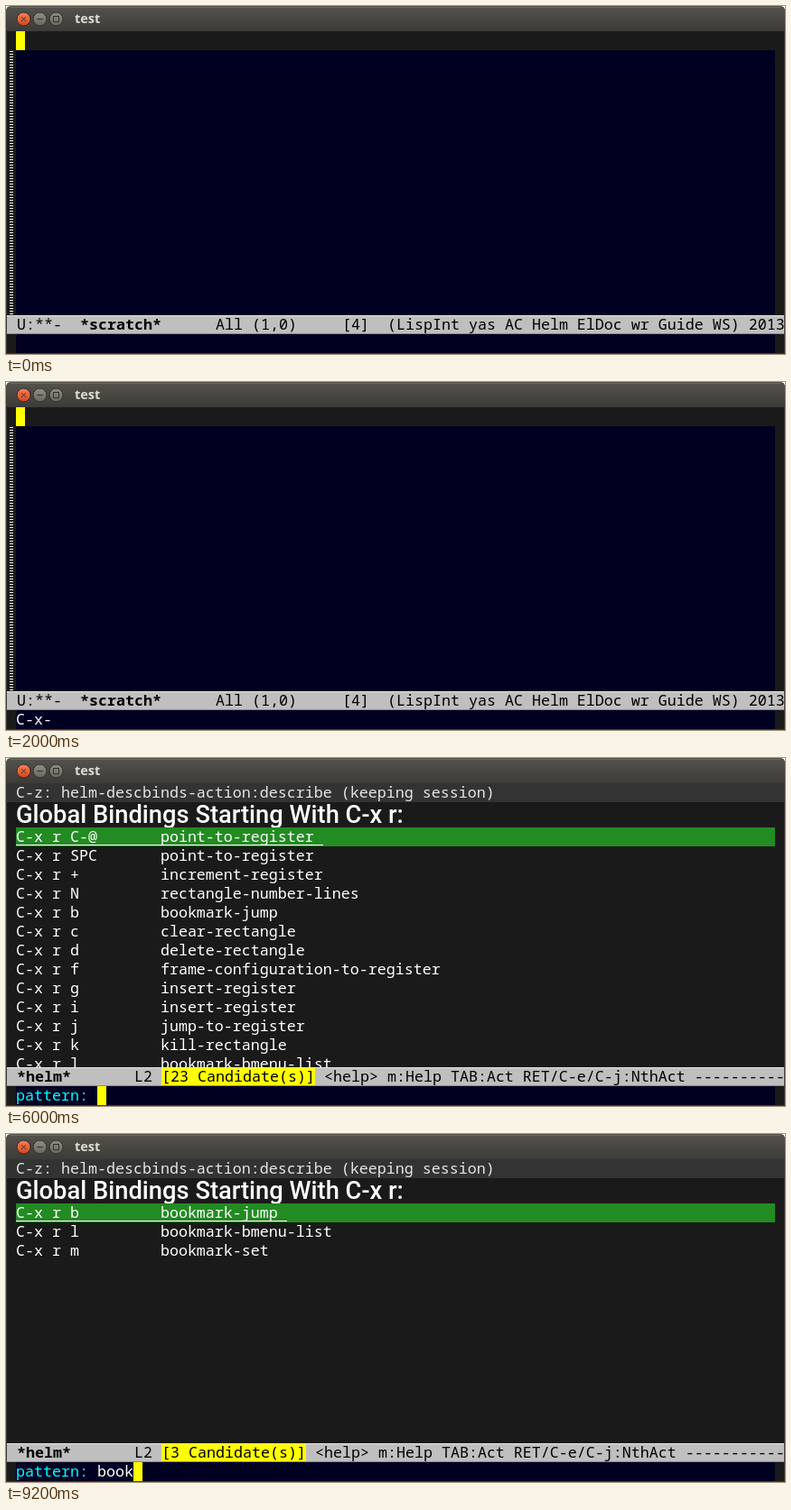
These frames come from a looping animation (862 px wide and 386 px high, 10 s). An HTML page:

```html
<!DOCTYPE html>
<html lang="en">
<head>
<meta charset="utf-8">
<title>test</title>
<style>
  html, body { margin: 0; width: 100%; height: 100%; overflow: hidden; background: #fff; }
  #stage { display: block; width: 862px; height: 386px; }
  text { font: 16.6667px "Noto Sans Mono", "DejaVu Sans Mono", monospace; fill: #fff; white-space: pre; }
  rect { shape-rendering: crispEdges; }
  .bold { font-weight: 700; }
  .title { font: 700 14.5px "Open Sans", "Noto Sans", sans-serif; fill: #dfdbd2; }
  .heading { font: 500 27.3px Roboto, "Noto Sans", sans-serif; }
  .key { fill: #f00; }
  .scene { visibility: hidden; animation: show 10s step-end infinite; animation-delay: calc((var(--i) - 5) * 2s); }
  @keyframes show {
    0% { visibility: visible; }
    20%, 100% { visibility: hidden; }
  }
</style>
</head>
<body>
<svg id="stage" viewBox="0 0 862 386" xmlns="http://www.w3.org/2000/svg"></svg>
<script>
const CELL = 10, ROW = 21, TOP = 28, MODE = 343, ECHO = 364;
const DARK = '#1a1a1a', NAVY = '#000020', YELLOW = '#ff0', FRAME = '#3c3b37';

const esc = s => s.replace(/&/g, '&amp;').replace(/</g, '&lt;');
const rect = (x, y, w, h, fill) => `<rect x="${x}" y="${y}" width="${w}" height="${h}" fill="${fill}"/>`;
const raw = (x, top, markup, fill = '#fff', cls = '') =>
  `<text xml:space="preserve" x="${x}" y="${top + 16}" class="${cls}" style="fill:${fill}">${markup}</text>`;
const text = (x, top, s, fill, cls) => raw(x, top, esc(s), fill, cls);
const scene = (i, markup) => `<g class="scene" style="--i:${i}">${markup}</g>`;

// Tick marks beside the lines past the end of a buffer
const emptyLines = (x, top) => rect(x, top, 4, MODE - top, 'url(#ticks)');

// A status bar; parts are [column, string, bold, background]
function modeLine(x, width, parts, active = true) {
  const [bg, fg, name, light, shade] = active
    ? ['#bfbfbf', '#000', '#000', '#e5e5e5', '#8c8c8c']
    : ['#4d4d4d', '#ccc', '#fff', '#666', '#666'];
  let out = rect(0, 0, width, ROW, bg) + rect(0, 0, width, 1, light) + rect(0, ROW - 1, width, 1, shade);
  for (const [col, s, bold, mark] of parts) {
    const left = 11 + col * CELL;
    if (mark) out += rect(left, 1, s.length * CELL, ROW - 2, mark);
    out += text(left, 0, s, bold ? name : fg, bold ? 'bold' : '');
  }
  return `<svg x="${x}" y="${MODE}" width="${width}" height="${ROW}">${out}</svg>`;
}

function chrome() {
  const button = (x, fill) => `<circle cx="${x}" cy="14.5" r="7.5" fill="${fill}" stroke="#2e2d29"/>`;
  return `<defs>
      <linearGradient id="bar" x2="0" y2="1"><stop stop-color="#54534d"/><stop offset="1" stop-color="${FRAME}"/></linearGradient>
      <linearGradient id="red" x2="0" y2="1"><stop stop-color="#f68058"/><stop offset="1" stop-color="#d9431a"/></linearGradient>
      <linearGradient id="grey" x2="0" y2="1"><stop stop-color="#8f8c83"/><stop offset="1" stop-color="#68665f"/></linearGradient>
      <pattern id="ticks" y="50" width="4" height="3" patternUnits="userSpaceOnUse">${rect(0, 0, 4, 1, '#fff')}</pattern>
    </defs>
    <path d="M0 386V6Q0 0 6 0H856Q862 0 862 6V386Z" fill="${FRAME}"/>
    <path d="M0 28V6Q0 0 6 0H856Q862 0 862 6V28Z" fill="url(#bar)"/>
    <path d="M5 1.5H857" stroke="#6b6a63"/>
    ${button(19.5, 'url(#red)')}${button(37.5, 'url(#grey)')}${button(55.5, 'url(#grey)')}
    <path d="M17 12l5 5m0-5l-5 5M34 14.5h7M52.5 11.5h6v6h-6z" fill="none" stroke="#3a2e28"/>
    <text class="title" x="76" y="19">test</text>`;
}

function scratch() {
  return rect(1, TOP, 860, 357, DARK)
    + rect(11, 49, 840, MODE - 49, NAVY) + emptyLines(4, 50)
    + rect(11, TOP, CELL, ROW, YELLOW)
    + modeLine(1, 860, [
        [0, 'U:**-'], [7, '*scratch*', true], [22, 'All (1,0)'], [36, '[4]'],
        [41, '(LispInt yas AC Helm ElDoc wr Guide WS) 2013']])
    + rect(11, ECHO, 840, ROW, NAVY);
}

// Every binding under the prefix, in key order
const bindings = `C-@ point-to-register
SPC point-to-register
+ increment-register
N rectangle-number-lines
b bookmark-jump
c clear-rectangle
d delete-rectangle
f frame-configuration-to-register
g insert-register
i insert-register
j jump-to-register
k kill-rectangle
l bookmark-bmenu-list
m bookmark-set
n number-to-register
o open-rectangle
r copy-rectangle-to-register
s copy-to-register
t string-rectangle
w window-configuration-to-register
x copy-to-register
y yank-rectangle
C-SPC point-to-register`.split('\n').map(line => line.split(' '));

function guide() {
  const cells = bindings.map(([key, command], i) =>
    raw(141 + (i % 2) * 320, TOP + (i >> 1) * ROW,
      `<tspan class="key">[</tspan>${key}<tspan class="key">]</tspan> ${command}`));
  return rect(1, TOP, 860, MODE - TOP, DARK)
    + rect(11, 49, 110, MODE - 49, NAVY) + emptyLines(4, 50)
    + rect(141, TOP, 710, MODE - TOP, NAVY) + emptyLines(134, 281)
    + rect(131, TOP, 1, MODE - TOP, '#fff')
    + cells.join('')
    + `<rect x="141.5" y="28.5" width="9" height="20" fill="none" stroke="${YELLOW}"/>`
    + modeLine(1, 130, [[0, 'U:**-'], [7, '*scratch*', true]])
    + modeLine(131, 730, [
        [0, 'U:**-'], [8, '*guide-key*', true], [22, 'All (1,0)'], [36, '[4]'],
        [41, '(Fundamental Helm Guide WS) 2013']], false)
    + text(11, ECHO, 'C-x r-');
}

function helm(pattern) {
  const found = bindings.filter(([, command]) => command.includes(pattern));
  const count = `[${found.length} Candidate(s)]`;
  const rows = found.slice(0, 13).map(([key, command], i) =>
    text(11, 77 + i * ROW, `C-x r ${key}`.padEnd(16) + command));
  const cursor = 101 + pattern.length * CELL;
  return rect(1, TOP, 860, MODE - TOP, DARK)
    + rect(1, TOP, 860, ROW, '#333')
    + text(11, TOP, 'C-z: helm-descbinds-action:describe (keeping session)', '#e5e5e5')
    + '<text class="heading" x="11" y="72">Global Bindings Starting With C-x r:</text>'
    + rect(11, 77, 840, ROW, '#228b22')
    + rect(11, 96, (17 + found[0][1].length) * CELL, 1, '#fff')
    + rows.join('')
    + modeLine(1, 860, [
        [0, '*helm*', true], [13, 'L2'], [16, count, false, YELLOW],
        [17 + count.length, '<help> m:Help TAB:Act RET/C-e/C-j:NthAct ' + '-'.repeat(12)]])
    + text(11, ECHO, 'pattern:', '#0ff') + text(101, ECHO, pattern)
    + rect(cursor, ECHO, CELL, ROW, YELLOW);
}

document.getElementById('stage').innerHTML = chrome() + scratch()
  + scene(1, text(11, ECHO, 'C-x-'))
  + scene(2, guide())
  + scene(3, helm(''))
  + scene(4, helm('book'));
</script>
</body>
</html>
```
